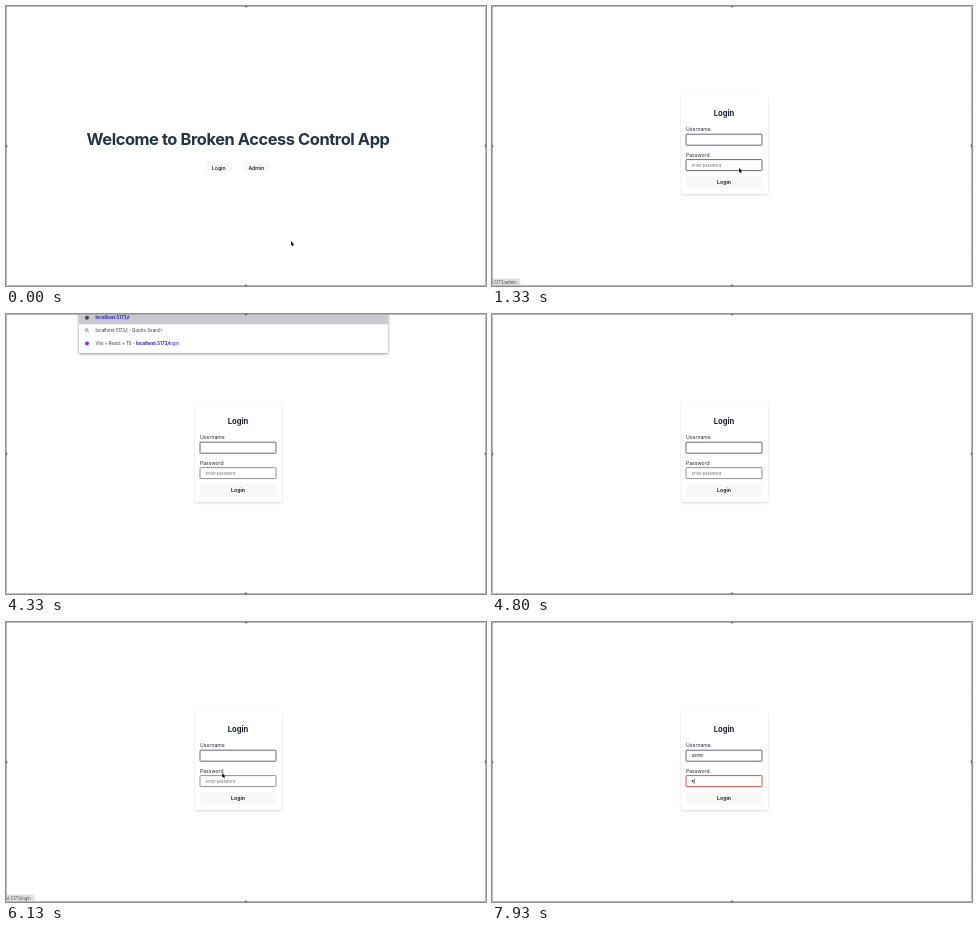
Write an HTML page that moves like this. It is 480 px wide and 280 px high and loops after 8 s.

```html
<!DOCTYPE html>
<html lang="en">
<head>
<meta charset="utf-8">
<title>Login walkthrough</title>
<style>
  html, body { margin: 0; width: 100%; height: 100%; overflow: hidden; background: #fff; }
  svg { display: block; width: 100%; height: 100%; font-family: Inter, Roboto, sans-serif; fill: #213547; }
  .title { font-size: 16.4px; font-weight: 700; letter-spacing: -.025em; }
  .head { font-size: 7.6px; font-weight: 700; fill: #17212e; }
  .btn { font-size: 5.2px; font-weight: 500; fill: #111; }
  .strong { font-weight: 600; }
  .label { font-size: 5.1px; fill: #1e293b; }
  .field { font-size: 4px; }
  .item { font-size: 4.2px; font-weight: 500; fill: #222; }
  .omni { font-size: 4.4px; fill: #333; }
  .link { fill: #2a1bc8; }
  .bold { font-weight: 700; }
  .mid { text-anchor: middle; }
  .card { filter: drop-shadow(0 1.2px 1.2px rgba(0, 0, 0, .16)); }
  .popup { filter: drop-shadow(0 .8px 1.2px rgba(0, 0, 0, .35)); }
  .omnibox { filter: drop-shadow(0 1px 1.8px rgba(30, 20, 60, .5)); }
</style>
</head>
<body>
<svg id="stage" viewBox="0 0 480 280" preserveAspectRatio="none"></svg>
<script>
const LOOP = 8000, FPS = 15;
const stage = document.getElementById('stage');

const text = (x, y, cls, str) => `<text x="${x}" y="${y}" class="${cls}">${str}</text>`;
const rect = (x, y, w, h, fill, extra = '') =>
  `<rect x="${x}" y="${y}" width="${w}" height="${h}" fill="${fill}" ${extra}/>`;

// Pointer tracks: [ms, x, y]; hidden between tracks
const tracks = [
  [[0, 285, 235], [67, 225, 185], [133, 152, 128], [200, 152, 128], [600, 205, 159], [1000, 249, 161],
   [1200, 249, 161], [1333, 247, 162], [1467, 243, 150], [1600, 210, 95], [1733, 165, 35]],
  [[2400, 128, 1], [2533, 126, 0]],
  [[5333, 235, 187], [5600, 216, 166], [5733, 213.5, 162], [6000, 213.5, 162], [6267, 219, 140], [6467, 221, 132]]
];

function pointerAt(t) {
  const track = tracks.find(k => t >= k[0][0] - 5 && t <= k[k.length - 1][0] + 5);
  if (!track) return null;
  const i = Math.max(1, track.findIndex(k => k[0] >= t));
  const [t0, x0, y0] = track[i - 1], [t1, x1, y1] = track[i];
  const p = Math.min(1, Math.max(0, (t - t0) / (t1 - t0)));
  return { x: x0 + (x1 - x0) * p, y: y0 + (y1 - y0) * p };
}

const over = (p, x, y, w, h) => p && p.x >= x && p.x <= x + w && p.y >= y && p.y <= y + h;

function button(x, w, label, p) {
  const ring = over(p, x, 155.5, w, 12) ? 'stroke="#d4606e" stroke-width=".9"' : '';
  return rect(x, 155.5, w, 12, '#f9f9f9', `rx="2.4" ${ring}`) +
    text(x + w / 2, 163.5, 'btn mid', label);
}

const welcome = p =>
  text(232, 138.6, 'title mid', 'Welcome to Broken Access Control App') +
  button(200, 25.4, 'Login', p) + button(236.4, 28, 'Admin', p);

function field(y, hint, value, focus, hover) {
  const stroke = focus ? '#d3423f' : value || hover ? '#55566a' : '#85858c';
  const caret = focus ? rect(value.x || 199.7, y + 3.2, .7, 5, '#222') : '';
  const body = value.dots
    ? '<circle cx="200.6" cy="159.1" r=".9" fill="#222"/>'
    : `<text x="199.8" y="${y + 7.2}" class="field" fill="${value ? '#222' : '#757575'}">${value || hint}</text>`;
  return rect(194, y, 76, 11, '#fff', `rx=".8" stroke="${stroke}" stroke-width=".9"`) + body + caret;
}

function suggestions(names) {
  const rows = names.map((n, i) => text(229, 151 + i * 11.6, 'item', n)).join('');
  return rect(225.3, 143, 50.2, 2 + names.length * 11.6, '#fff', 'class="popup" rx=".8"') + rows;
}

function login(t, p) {
  const typed = [[7600, 5], [7467, 4], [7267, 3], [6867, 2], [6800, 1]].find(k => t >= k[0] - 5);
  const name = typed ? 'admin'.slice(0, typed[1]) : '';
  const onUser = t > 6460 && t < 7660, onPass = t >= 7660;
  const caretX = 199.8 + [0, 2.3, 4.8, 8.5, 9.6, 12][name.length];
  const user = Object.assign(name ? new String(name) : '', name && { x: caretX });
  const pass = t >= 7925 ? { dots: 1, x: 201.8 } : '';
  let out = rect(189, 89, 87, 99, '#fff', 'class="card" rx="1.5"') +
    text(232, 110, 'head mid', 'Login') +
    text(194, 125.2, 'label', 'Username') +
    field(128.2, 'Enter your username', user, onUser, over(p, 194, 128, 76, 11)) +
    text(194, 150.6, 'label', 'Password') +
    field(153.6, 'Enter password', pass, onPass, over(p, 194, 153, 76, 11)) +
    rect(194, 170, 76, 12.6, '#f8f8f8', 'rx="2"') +
    text(232, 178.2, 'btn strong mid', 'Login');
  if (onUser && t > 6525)
    out += suggestions(name ? ['admin_kt', 'admin'] : ['torvikelda', 'admin_kt', 'admin', 'belquorinda']);
  return out;
}

function omnibox(query) {
  const lens = '<g fill="none" stroke="#666" stroke-width=".6"><circle cx="80.6" cy="16" r="1.4"/><path d="M81.6 17l1.4 1.4"/></g>';
  return rect(73, -4, 309, 43, '#fff', 'class="omnibox" rx="1.5"') +
    rect(73, 0, 309, 10.3, '#cbc8d0') +
    '<circle cx="81" cy="3.8" r="2" fill="#444"/>' +
    text(89.4, 5.4, 'omni link bold', query) + lens +
    text(89.4, 18.2, 'omni', query + ' - Quorlo Search') +
    '<circle cx="81" cy="29.6" r="2" fill="#8a2fc0"/>' +
    text(89.4, 31.2, 'omni', 'Vite + React + TS - <tspan class="link"><tspan class="bold">localhost:5173/l</tspan>ogin</tspan>');
}

const status = path =>
  rect(-3, 273, 31, 9, '#e4e4e6', 'rx="1.5" stroke="#cfcfd2" stroke-width=".5"') +
  `<text x="24.8" y="278" font-size="4.2" text-anchor="end" fill="#444">localhost:5173/${path}</text>`;

const arrow = p =>
  `<path transform="translate(${p.x} ${p.y})" d="M0 0V4.6L1.1 3.7L1.8 5.3L2.6 4.9L1.9 3.4H3.3Z" fill="#000" stroke="#fff" stroke-width=".5" paint-order="stroke"/>`;

const edges =
  '<rect x=".5" y=".5" width="479" height="279" fill="none" stroke="#a6a6a6" stroke-dasharray="1.5 .5"/>' +
  [[240, 0], [240, 280], [0, 140], [480, 140]]
    .map(([x, y]) => `<circle cx="${x}" cy="${y}" r="1.4" fill="#666"/>`).join('');

function draw(ms) {
  const t = Math.floor((ms + 5) * FPS / 1000) * 1000 / FPS;
  const within = (a, b) => t >= a - 5 && t < b - 5;
  const p = pointerAt(t);
  const home = t < 1128 || within(4867, 6000);
  let out = home ? welcome(p) : login(t, p);
  if (within(4333, 4667)) out += omnibox('localhost:5173/l');
  if (within(4667, 4800)) out += omnibox('localhost:5173/');
  if (within(1000, 1400)) out += status('admin');
  if (within(5867, 6200)) out += status('login');
  stage.innerHTML = out + (p ? arrow(p) : '') + edges;
}

function tick(now) {
  draw(now % LOOP);
  requestAnimationFrame(tick);
}
draw(0);
requestAnimationFrame(tick);
</script>
</body>
</html>
```
